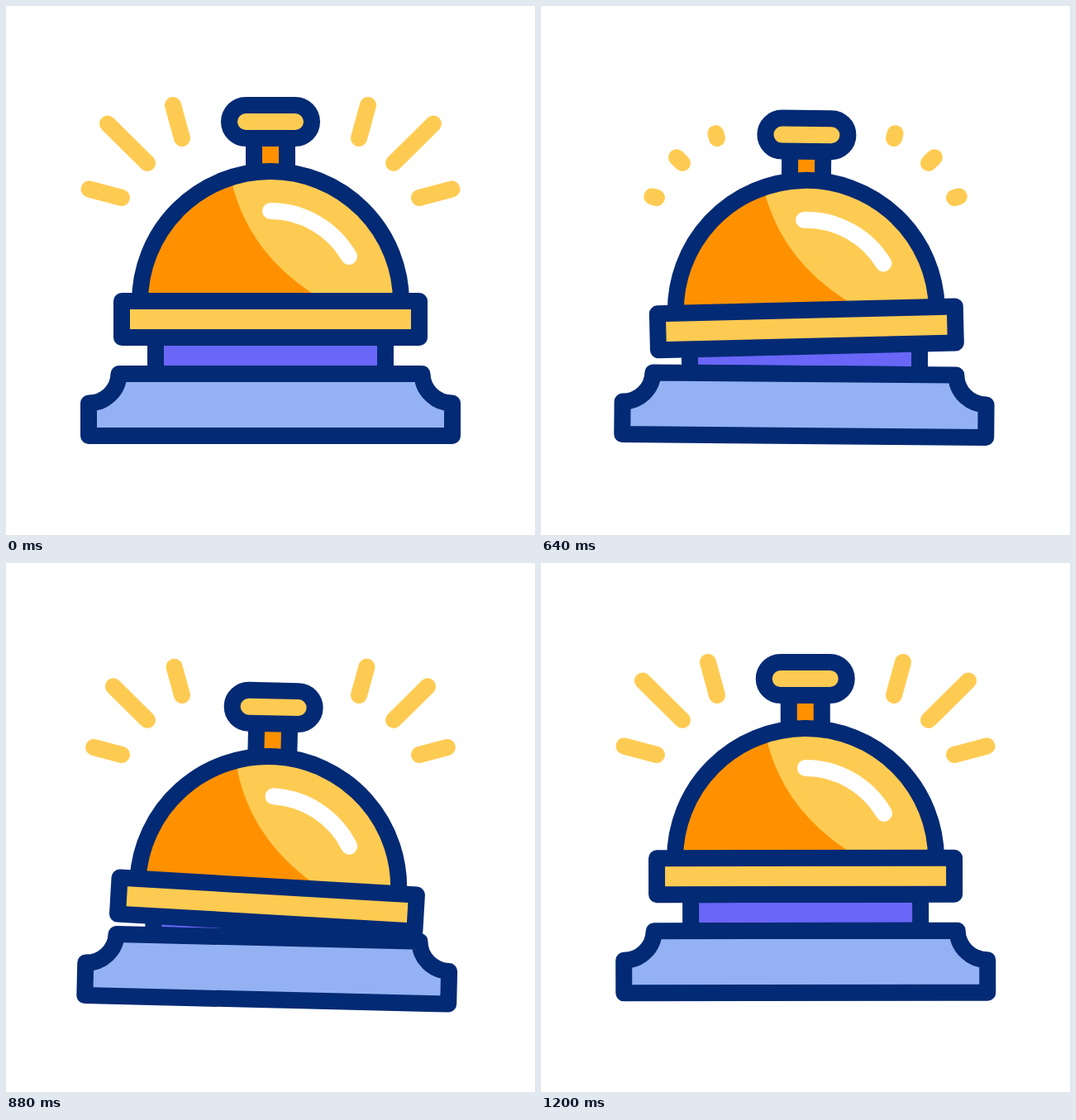
An HTML page for the animation above (1240 ms loop, 640 px wide and 640 px high).

```html
<!DOCTYPE html>
<html lang="en">
<head>
<meta charset="utf-8">
<title>Service bell</title>
<style>
  html, body { margin: 0; height: 100%; overflow: hidden; background: #fff; }
  svg { display: block; width: 100%; height: 100%; }
  .ink { stroke: #032a74; stroke-width: 20; stroke-linejoin: round; }
  .round { fill: none; stroke-width: 20; stroke-linecap: round; }
</style>
</head>
<body>
<svg viewBox="0 0 640 640">
  <g id="rays" class="round" stroke="#fecb52"></g>
  <g id="all">
    <g class="ink">
      <path fill="#6a66f8" d="M181 401H459V445H181Z"/>
      <path fill="#94b2f3" d="M136.500 445H503.500A36.500 36 0 0 0 540 480.500V520H100V480.500A36.500 36 0 0 0 136.500 445Z"/>
    </g>
    <g id="knob" class="ink">
      <path fill="#ff9100" d="M300 150H340V205H300Z"/>
      <rect fill="#fecb52" x="270" y="120" width="100" height="40" rx="20"/>
    </g>
    <g id="bell">
      <path fill="#fecb52" d="M162 358A158 158 0 0 1 478 358Z"/>
      <path fill="#ff9100" d="M162 358A158 158 0 0 1 272 208Q292 302 384 356Z"/>
      <path class="ink" fill="none" d="M162 358A158 158 0 0 1 478 358"/>
      <path class="round" stroke="#fff" d="M320 248A110 110 0 0 1 415 303"/>
      <path class="ink" fill="#fecb52" d="M140 357H500V401H140Z"/>
    </g>
  </g>
</svg>
<script>
const LOOP = 1240, STEP = 40;
const el = id => document.getElementById(id);
const clamp = v => Math.min(1, Math.max(0, v));
const mix = (a, b, u) => a + (b - a) * u;

// Eased value at time t from a list of [time, value] keys.
function track(keys, t) {
  const i = keys.findIndex(k => k[0] > t);
  if (i < 0) return keys[keys.length - 1][1];
  if (i === 0) return keys[0][1];
  const [t0, a] = keys[i - 1], [t1, b] = keys[i];
  const u = (t - t0) / (t1 - t0);
  return mix(a, b, u * u * (3 - 2 * u));
}

const tilt = [[590, 0], [783, 3], [1065, -3], [1215, 0]];
const drop = [[645, 0], [805, 9.3], [825, 9.3], [1105, 0]];
const bellTilt = [[570, 0], [650, -2], [870, 2], [1040, 0]];
const bellDrop = [[578, 0], [755, 38.5], [1080, 0]];
const knobDrop = [[582, 0], [740, 52], [1020, 0]];

// Rays run from the outer end to the inner end; the right side mirrors the left.
const left = [[100.5, 221.5, 140, 232], [123, 142.5, 171, 190], [202, 120, 213, 160]];
const rays = left.concat(left.map(([x, y, u, v]) => [640 - x, y, 640 - u, v])).map(ends => {
  const path = document.createElementNS("http://www.w3.org/2000/svg", "path");
  el("rays").append(path);
  return { path, ends };
});

function drawRays(t) {
  const shrink = clamp((t - 95) / 425) ** 1.33;
  const grow = 1 - (1 - clamp((t - 607) / 440)) ** 2;
  const from = grow > 0 ? 1 - grow : 0;
  const to = grow > 0 ? 1 : 1 - shrink;
  for (const { path, ends: [x, y, u, v] } of rays) {
    const at = k => `${mix(x, u, k)} ${mix(y, v, k)}`;
    path.setAttribute("d", to > from ? `M${at(from)}L${at(to)}` : "");
  }
}

const pose = (id, y, angle) =>
  el(id).setAttribute("transform", `translate(0 ${y}) rotate(${angle} 320 320)`);

function frame(now) {
  const t = Math.floor(now % LOOP / STEP) * STEP;
  drawRays(t);
  pose("all", track(drop, t), track(tilt, t));
  pose("bell", track(bellDrop, t), track(bellTilt, t));
  pose("knob", track(knobDrop, t), 0);
  requestAnimationFrame(frame);
}
frame(0);
</script>
</body>
</html>
```
